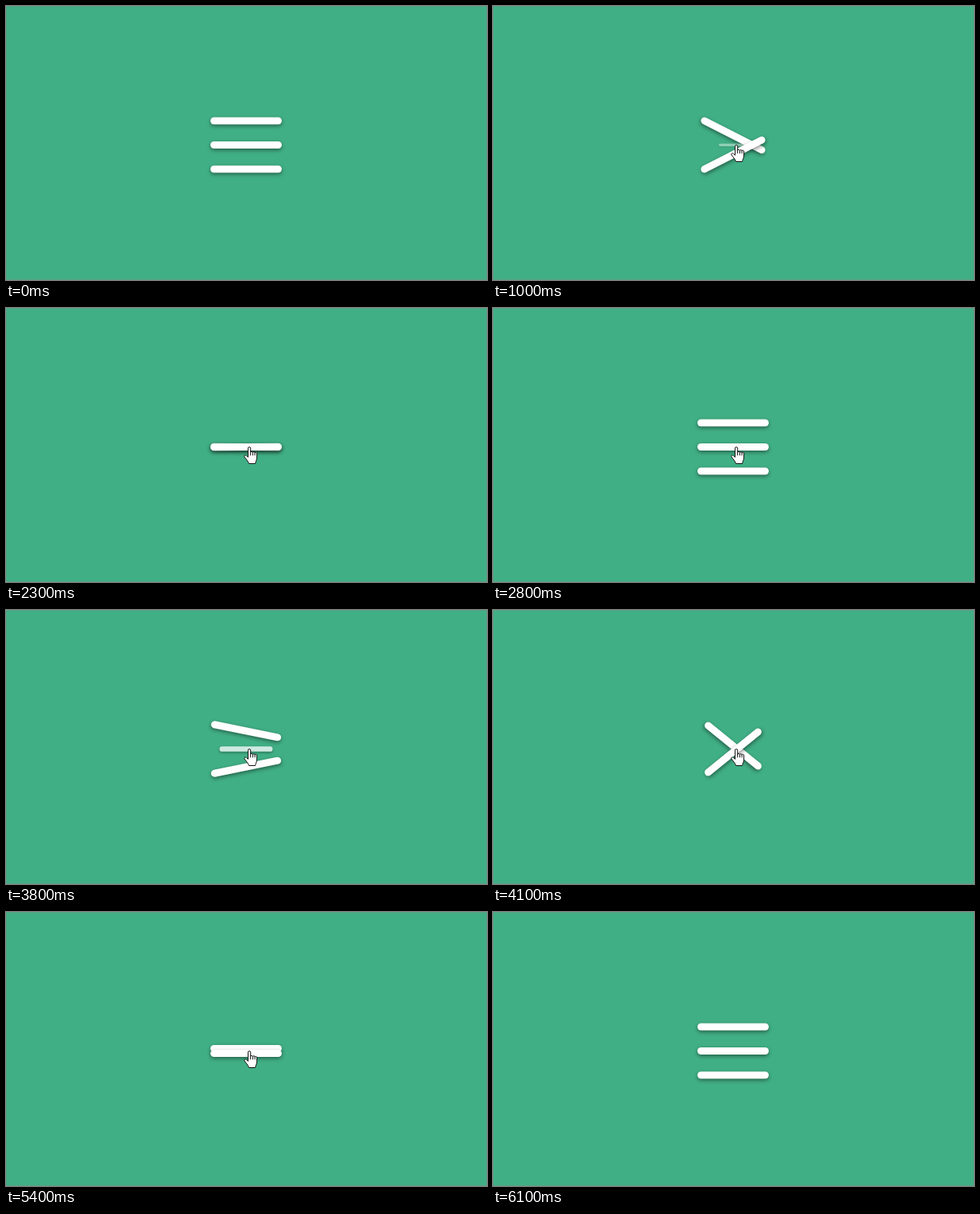
Recreate the animation shown at these times as an HTML page. Size 607 by 346 pixels, loop 6400 ms.

```html
<!DOCTYPE html>
<html lang="en">
<head>
<meta charset="utf-8">
<title>Menu icon</title>
<style>
  html, body { margin: 0; width: 100%; height: 100%; overflow: hidden; }
  body { position: relative; background: #41af85; }
  body::after {
    content: ""; position: absolute; inset: 0;
    border: 1px solid #5b9f86; box-sizing: border-box;
  }
  .bar {
    position: absolute; left: 258px; top: 170.5px; width: 90px; height: 9px;
    border-radius: 4.5px; background: #fff;
    box-shadow: 0 2px 5px rgba(0, 0, 0, .45);
  }
  svg { position: absolute; left: 0; top: 0; overflow: visible; }
  path { fill: #fff; stroke: #111; stroke-width: 1; stroke-linejoin: round; stroke-linecap: round; }
</style>
</head>
<body>
<div class="bar"></div>
<div class="bar"></div>
<div class="bar"></div>
<svg id="cursor" width="18" height="23">
  <g id="hand">
    <path d="M5.5 13V2.2a1.6 1.6 0 0 1 3.2 0V7.2a1.4 1.4 0 0 1 2.7 .4a1.4 1.4 0 0 1 2.7 .6a1.3 1.3 0 0 1 2.5 .8V14C16.6 17 15 18.5 14.6 21.5H6.6C5.8 18.5 2.5 15.5 .9 12.8C.2 11.2 2 10.3 3.2 11.3Z"/>
    <path d="M8.7 7.2V10.8M11.4 7.8V10.9M14.1 8.4V11"/>
  </g>
  <path id="arrow" d="M5.5 .5V16.5L9.2 13L11.6 18.5L14 17.5L11.6 12.2H16.8Z"/>
</svg>
<script>
const LOOP = 6400, STEP = 100;
const OPEN_TIME = 750, CLOSE_TIME = 850;
const GAP = 30.5, ANGLE = 45;
const clicks = [[803, 1960], [3730, 4960]];   // [open, close]
const home = [300, 175];

const [top_, middle, bottom] = document.querySelectorAll('.bar');
const [cursor, hand, arrow] = ['cursor', 'hand', 'arrow'].map(id => document.getElementById(id));

const clamp = x => Math.min(1, Math.max(0, x));
const easeOut = x => 1 - (1 - clamp(x)) ** 3;
const mix = (a, b, k) => a + (b - a) * k;

// turn: 0 level, 1 crossed; spread: 1 apart, 0 merged
function pose(t) {
  const [open, close] = clicks[t < clicks[1][0] ? 0 : 1];
  if (t < close) {
    const p = easeOut((t - open) / OPEN_TIME);
    return { turn: p, spread: 1 - p };
  }
  // Closing levels the bars first, then parts them
  const half = (t - close) / CLOSE_TIME * 2;
  return { turn: 1 - easeOut(half), spread: easeOut(half - 1) };
}

function drawBars(t) {
  const { turn, spread } = pose(t);
  const place = (bar, side) => bar.style.transform =
    `translateY(${side * GAP * spread}px) rotate(${-side * ANGLE * turn}deg)`;
  place(top_, -1);
  place(bottom, 1);
  middle.style.transform = `scale(${spread})`;
  middle.style.opacity = spread;
}

function cursorAt(t) {
  if (t < 700) {
    const k = easeOut((t - 200) / 300);
    return [mix(580, home[0] + 3, k), mix(310, home[1] + 2, k)];
  }
  const k = clamp((t - 5800) / 300) ** 2;
  return [mix(home[0], 318, k), mix(home[1], 350, k)];
}

function drawCursor(t) {
  const [x, y] = cursorAt(t);
  const over = x > 250 && x < 345 && y > 135 && y < 212;
  cursor.style.display = t >= 200 && t < 6100 ? '' : 'none';
  cursor.style.transform = `translate(${x}px, ${y}px)`;
  hand.style.display = over ? '' : 'none';
  arrow.style.display = over ? 'none' : '';
}

const start = performance.now();
function frame() {
  const elapsed = (performance.now() - start) % LOOP;
  const t = Math.floor(elapsed / STEP) * STEP;
  drawBars(t);
  drawCursor(t);
  requestAnimationFrame(frame);
}
frame();
</script>
</body>
</html>
```
